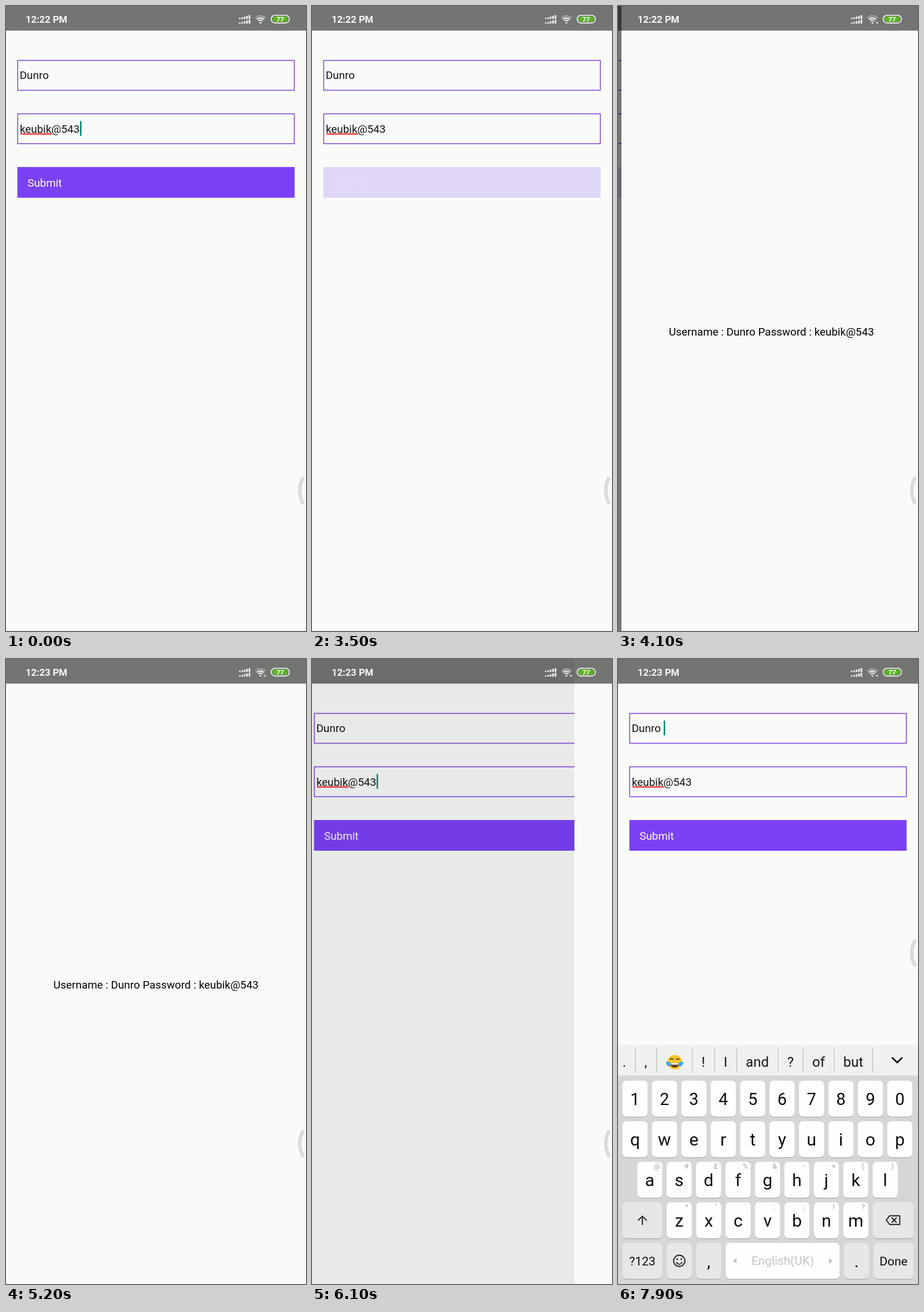
An HTML page with a canvas that plays this animation: 519x1079 px, repeating every 8 s.

```html
<!DOCTYPE html>
<html lang="en">
<head>
<meta charset="utf-8">
<title>Login form</title>
<style>
html, body { margin: 0; width: 100%; height: 100%; overflow: hidden; background: #f9fbf9; }
canvas { display: block; width: 519px; height: 1079px; }
</style>
</head>
<body>
<canvas id="stage" width="519" height="1079"></canvas>
<script>
const W = 519, H = 1079, LOOP = 8000, STEP = 100;
const PAGE = '#f9fbf9', BAR = '#727571', VIOLET = '#7a41f4', TEAL = '#0c8577', INK = '#111311';
const USER = 'Dunro', PASS = 'keubik@543';
const c = document.getElementById('stage').getContext('2d');

function text(str, x, y, size, color = INK, align = 'left', weight = 400) {
  c.font = `${weight} ${size}px Roboto, sans-serif`;
  c.fillStyle = color;
  c.textAlign = align;
  c.fillText(str, x, y);
}

function rect(x, y, w, h, color) {
  c.fillStyle = color;
  c.fillRect(x, y, w, h);
}

function round(x, y, w, h, r, color) {
  c.beginPath();
  c.roundRect(x, y, w, h, r);
  c.fillStyle = color;
  c.fill();
}

function arc(x, y, r, from, to, color, width) {
  c.beginPath();
  c.arc(x, y, r, from, to);
  c.strokeStyle = color;
  c.lineWidth = width;
  c.stroke();
}

function disc(x, y, r, color) {
  c.beginPath();
  c.arc(x, y, r, 0, Math.PI * 2);
  c.fillStyle = color;
  c.fill();
}

function line(points, color, width, close) {
  c.beginPath();
  points.forEach(([x, y]) => c.lineTo(x, y));
  if (close) c.closePath();
  c.strokeStyle = color;
  c.lineWidth = width;
  c.stroke();
}

function triangle(x, y, dir, color) {
  c.beginPath();
  c.moveTo(x - 3 * dir, y - 5);
  c.lineTo(x + 3 * dir, y);
  c.lineTo(x - 3 * dir, y + 5);
  c.fillStyle = color;
  c.fill();
}

function field(y) {
  c.strokeStyle = '#7d43da';
  c.lineWidth = 1.5;
  c.strokeRect(20.25, y + 0.75, 478.5, 51.5);
}

function page() {
  rect(0, 0, W, H, PAGE);
  rect(0, 0, W, 42.5, BAR);
}

function form(s) {
  page();
  field(93.2);
  text(USER, 23.7, 126.4, 18.9);
  field(185.4);
  text(PASS, 23.9, 218.7, 18.9);
  rect(25, 219.6, 54.5, 2.6, '#ee3f3f');
  if (s.passCaret) rect(128, 198.5, 2.6, 25.5, TEAL);
  if (s.userCaret) rect(s.userCaret, 106.2, 2.6, 25.5, TEAL);
  c.globalAlpha = s.pressed ? 0.2 : 1;
  rect(19.7, 278, 479.6, 53, VIOLET);
  text('Submit', 37.2, 312, 18.9, '#fff');
  c.globalAlpha = 1;
}

function result() {
  page();
  text(`Username : ${USER} Password : ${PASS}`, W / 2, 568.6, 18.87, '#000', 'center');
}

function status(minute, traffic) {
  const white = '#f7f8f7';
  text(`12:${minute} PM`, 34, 28.8, 16.6, white, 'left', 700);
  [2, 2.8, 4, 5.4, 6.6].forEach((h, i) => {
    const x = 403 + i * 4.2;
    rect(x, 22.4 - h, 2.7, h, white);
    rect(x, 30.4 - h, 2.7, h, white);
  });
  const up = -Math.PI / 2;
  arc(440.2, 29, 12, up - 0.82, up + 0.82, '#a9aba8', 2.2);
  arc(440.2, 29, 8.3, up - 0.82, up + 0.82, white, 2.3);
  arc(440.2, 29, 4.6, up - 0.82, up + 0.82, white, 2.3);
  disc(440.2, 28.8, 1.6, white);
  if (traffic) {
    rect(445.4, 26.6, 4.8, 4.6, BAR);
    line([[446, 28.2], [447, 27], [447, 30.6]], white, 0.9);
    line([[449, 27], [449, 30.6], [450, 29.4]], white, 0.9);
  }
  c.beginPath();
  c.roundRect(458.8, 16, 31.4, 13.4, 6.5);
  c.strokeStyle = white;
  c.lineWidth = 1.6;
  c.stroke();
  round(461, 18.1, 26, 9.2, 4, '#5bb622');
  text('77', 474.3, 26.8, 11.5, '#fff', 'center', 700);
}

function handle(y) {
  c.lineCap = 'round';
  for (const [color, width] of [['#c9cbc9', 5.6], ['#dcdedc', 4]]) {
    c.beginPath();
    c.moveTo(513, y - 20.5);
    c.quadraticCurveTo(503.6, y, 513, y + 20.5);
    c.strokeStyle = color;
    c.lineWidth = width;
    c.stroke();
  }
  c.lineCap = 'butt';
}

function key(x, y, w, label, hint, grey, size = 30) {
  round(x, y + 1.6, w, 62, 7, '#b4b6b4');
  round(x, y, w, 62, 7, grey ? '#e6e8e6' : '#fdfefd');
  if (label) text(label, x + w / 2, y + (size < 25 ? 38.7 : 41.6), size, '#0c0d0c', 'center');
  if (hint) text(hint, x + w - 9, y + 12, 12.5, '#b2b4b2', 'center', 500);
}

function row(chars, x, y, hints = '', size) {
  [...chars].forEach((ch, i) => key(x + i * 50.9, y, 43.5, ch, hints[i], false, size));
}

function laughing(x, y) {
  disc(x, y, 12.6, '#fcc72f');
  c.beginPath();
  c.arc(x, y + 1.5, 8, 0, Math.PI);
  c.closePath();
  c.fillStyle = '#5f3a1c';
  c.fill();
  rect(x - 6.6, y + 1.5, 13.2, 2.8, '#fff');
  for (const d of [-1, 1]) {
    arc(x + d * 5.2, y - 3, 3, Math.PI * 1.1, Math.PI * 1.9, '#5f3a1c', 1.8);
    c.beginPath();
    c.ellipse(x + d * 11, y + 3, 3, 4.8, d * 0.7, 0, Math.PI * 2);
    c.fillStyle = '#3fa7ea';
    c.fill();
  }
}

function suggestions() {
  const words = [['.', 11], [',', 48], ['!', 147.5], ['I', 186], ['and', 241],
    ['?', 298.5], ['of', 347], ['but', 407]];
  words.forEach(([word, x]) => text(word, x, 704, 24, '#161716', 'center'));
  laughing(98, 696);
  [30, 67, 128.5, 167, 205.5, 277, 320, 374, 440.5].forEach(x => rect(x - 0.7, 672, 1.4, 42, '#c3c5c3'));
}

function keyboard(drop, filled, spaceDown) {
  const dark = '#222422', faint = '#c3c5c3';
  c.save();
  c.translate(0, drop);
  rect(0, 666.5, W, 53, '#eff1ef');
  rect(0, 719, W, 360, '#d5d7d5');
  if (filled) suggestions();
  line([[474, 688], [483, 696.5], [492, 688]], '#161716', 2.8);

  row('1234567890', 7.7, 728, '', 29);
  row('qwertyuiop', 7.7, 798);
  row('asdfghjkl', 33.2, 868, '@#£%&-+()');
  key(7.7, 938, 69, '', '', true);
  row('zxcvbnm', 84.3, 938, '*"\':;!?');
  key(441, 938, 70.5, '', '', true);

  line([[42.2, 977], [42.2, 962]], dark, 2);
  line([[34.6, 969.4], [42.2, 961.8], [49.8, 969.4]], dark, 2);
  line([[464, 968.8], [470, 961.3], [487.5, 961.3], [487.5, 976.3], [470, 976.3]], dark, 1.9, true);
  line([[473.5, 964.5], [482, 973]], dark, 1.9);
  line([[482, 964.5], [473.5, 973]], dark, 1.9);

  key(7.7, 1008, 69, '?123', '', true, 21);
  key(84.3, 1008, 43.5, '', '', true);
  key(135.2, 1008, 43.5, ',', '', true);
  key(186.4, 1008, 197, '', '', spaceDown);
  key(391, 1008, 43.5, '.', '', true);
  key(441.8, 1008, 69.7, 'Done', '', true, 21);
  [170.5, 426.5, 503.5].forEach(x => text('...', x, 1066, 11, '#b2b4b2', 'center'));
  text('English(UK)', 285, 1046.4, 20.8, faint, 'center');
  triangle(202, 1039, -1, faint);
  triangle(368, 1039, 1, faint);

  arc(106, 1039, 9.8, 0, Math.PI * 2, dark, 1.9);
  arc(106, 1039.8, 5, 0.25, Math.PI - 0.25, dark, 1.8);
  disc(102.5, 1036, 1.5, dark);
  disc(109.5, 1036, 1.5, dark);
  c.restore();
}

// Critically damped spring, settled at `end`
function spring(t, start, end) {
  if (t <= start) return 0;
  if (t >= end) return 1;
  const x = 0.01447 * (t - start);
  return 1 - (1 + x) * Math.exp(-x);
}

function passCaretOn(t) {
  if (t < 3700) return t % 1000 < 500;
  return t >= 5700 && t < 6500;
}

function draw(t) {
  const cover = spring(t, 3650, 4200) - spring(t, 5851, 6500);
  const state = {
    pressed: t >= 3500 && t < 5000,
    passCaret: passCaretOn(t),
    userCaret: t >= 7700 ? 79 : t >= 6700 ? 74.3 : 0
  };

  c.save();
  c.translate(-W * 0.25 * cover, 0);
  form(state);
  c.restore();

  if (cover > 0) {
    rect(0, 0, W, H, `rgba(0,0,0,${0.53 * cover})`);
    c.save();
    c.translate(Math.round(W * (1 - cover)), 0);
    result();
    c.restore();
  }

  status(t < 5200 ? 22 : 23, t >= 4000);
  if (t >= 7000) {
    const left = Math.max(0, (7300 - t) / 340);
    keyboard(413 * left ** 3, t >= 7700, t >= 7600 && t < 7700);
  }
  handle(t < 7200 ? 836.5 : 507.8);
}

function tick() {
  const t = performance.now() % LOOP;
  draw(Math.floor(t / STEP) * STEP);
  requestAnimationFrame(tick);
}
tick();
</script>
</body>
</html>
```
